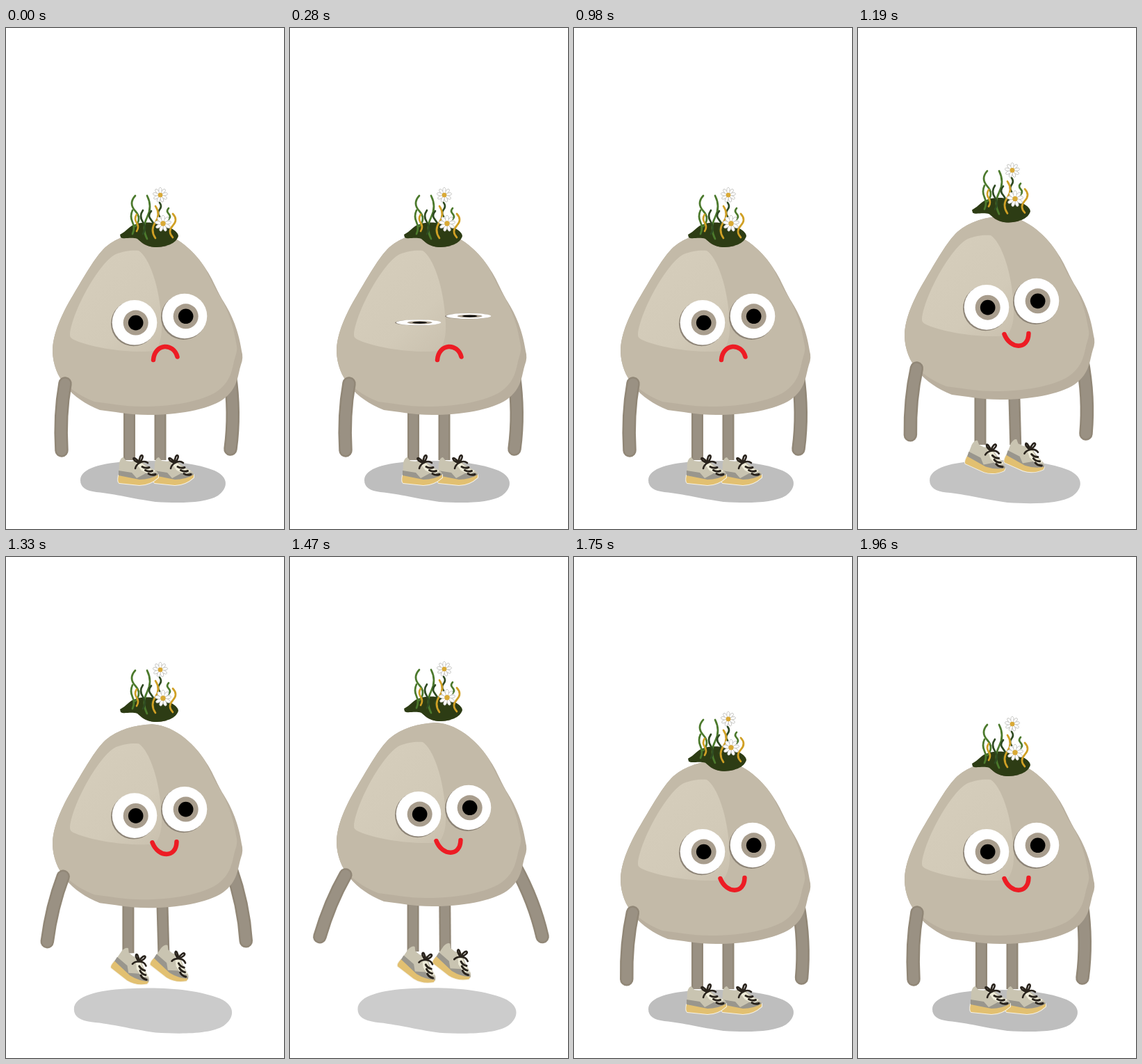
An HTML page with a canvas for the animation above (2100 ms loop, 400 by 720 pixels).

```html
<!DOCTYPE html>
<html lang="en">
<head>
<meta charset="utf-8">
<title>Jumping stone</title>
<style>
html, body { margin: 0; width: 100%; height: 100%; overflow: hidden; background: #fff; }
canvas { display: block; width: 400px; height: 720px; }
</style>
</head>
<body>
<canvas id="stage" width="400" height="720"></canvas>
<script>
const ctx = document.getElementById('stage').getContext('2d');
const LOOP = 2100, STEP = 70;

const shapes = {
  ground: 'M107 650C107 632 140 625 175 623C225 620 270 624 300 636C322 646 319 662 305 672' +
    'C287 683 250 683 215 681C180 676 160 670 130 667C115 665 107 660 107 650Z',
  stone: 'M210 292C185 293 160 300 143 315C128 329 112 358 97 383C80 411 67 440 67 465' +
    'C68 502 94 533 135 549C155 551 175 556 205 556C245 556 290 549 312 534' +
    'C334 518 333 500 338 484Q342 474 339 464C334 430 322 407 311 390C300 370 297 360 288 347' +
    'C275 325 245 294 210 292Z',
  shine: 'M92 440C96 405 135 336 158 325C170 320 182 319 191 320C206 330 222 372 224 425' +
    'Q225 452 214 464C180 468 125 460 100 449Q91 446 92 440Z',
  mound: 'M164 297Q171 293 176 288C185 279 203 278 217 281C234 284 248 292 248 299' +
    'C245 310 230 315 214 315C201 314 195 308 189 303C180 300 169 304 165 301Z',
  soil: 'M190 302C196 313 211 318 232 313L218 308Z',
  leftArm: 'M0 0Q-8 45 -5 96',
  rightArm: 'M-3 -10Q5 45 -2 97',
  upper: 'M-14 0Q-12 -8 -8 -8L-4 -3L4 -2L14 -6Q22 3 36 10Q43 13 42 19Q28 26 15 26L-15 22Z',
  side: 'M-15 11L4 14L11 22L24 15L38 14Q43 15 42 19Q28 26 15 26L-15 22Z',
  tongue: 'M8 -2L18 0Q26 8 38 11L31 17L18 11Z',
  sole: 'M-15 18Q-17 27 -14 29L15 32Q30 32 42 21L42 17Q30 24 15 24Z',
  bow: 'M15 0C5 -14 2 -3 15 0C14 -17 26 -12 15 0M15 0Q22 -4 27 0M15 0Q10 3 9 8'
};
for (const name in shapes) shapes[name] = new Path2D(shapes[name]);

const progress = (t, from, to) => Math.min(1, Math.max(0, (t - from) / (to - from)));
const smooth = (t, from, to) => {
  const p = progress(t, from, to);
  return p * p * (3 - 2 * p);
};
const fall = (t, from, to) => progress(t, from, to) ** 1.5;

function poseAt(t) {
  const lift = 54 * (smooth(t, 1050, 1370) - fall(t, 1540, 1750));
  return {
    lift,
    tuft: 79 * (smooth(t, 1050, 1350) - fall(t, 1520, 1765)),
    swing: smooth(t, 1090, 1590) - smooth(t, 1580, 1790),
    tilt: smooth(lift, 0, 40),
    smile: smooth(t, 1050, 1190),
    open: 1 - .92 * Math.sin(Math.PI * progress(t, 140, 490))
  };
}

function fill(path, color) {
  ctx.fillStyle = color;
  ctx.fill(path);
}

function stroke(path, color, width, cap = 'round') {
  ctx.strokeStyle = color;
  ctx.lineWidth = width;
  ctx.lineCap = cap;
  ctx.lineJoin = 'round';
  ctx.stroke(path);
}

function disc(x, y, r, color) {
  ctx.beginPath();
  ctx.arc(x, y, r, 0, 7);
  ctx.fillStyle = color;
  ctx.fill();
}

function placed(x, y, degrees, draw) {
  ctx.save();
  ctx.translate(x, y);
  ctx.rotate(degrees * Math.PI / 180);
  draw();
  ctx.restore();
}

function drawLimb(path, width, cap) {
  stroke(path, '#918777', width, cap);
  stroke(path, '#9a9183', width - 5, cap);
}

function drawLeg(x, lift) {
  drawLimb(new Path2D(`M${x} ${540 - lift}V${621 - lift}`), 17, 'butt');
}

function drawShoe(x, y, turn) {
  placed(x, y, turn, () => {
    stroke(shapes.sole, '#f5f2e8', 2);
    fill(shapes.upper, '#c9c4b1');
    fill(shapes.side, '#99968d');
    fill(shapes.tongue, '#eeebd8');
    fill(shapes.sole, '#e2c071');
    for (let i = 0; i < 3; i++) {
      stroke(new Path2D(`M${19 + 4.5 * i} ${5.5 + 5 * i}q5 3 10 1`), '#29231c', 3);
    }
    stroke(shapes.bow, '#29231c', 2.6);
  });
}

function drawDaisy(x, y, r) {
  placed(x, y, 0, () => {
    for (let i = 0; i < 9; i++) {
      ctx.rotate(2 * Math.PI / 9);
      ctx.beginPath();
      ctx.ellipse(0, -r * .62, r * .2, r * .4, 0, 0, 7);
      ctx.fillStyle = '#fff';
      ctx.fill();
      ctx.strokeStyle = '#bdbdb9';
      ctx.lineWidth = .8;
      ctx.stroke();
    }
    disc(0, 0, r * .32, '#d9a935');
  });
}

// An S-shaped blade that first bends by the given amount
function drawBlade(color, x, top, height, bend) {
  const path = `M${x} ${top}q${2 * bend} ${height / 4} 0 ${height / 2}t0 ${height / 2}`;
  stroke(new Path2D(path), color, 2.7);
}

function drawTuft() {
  const green = '#4c7a2d', dark = '#2f4a22', yellow = '#d0a025';
  fill(shapes.soil, '#5c5040');
  fill(shapes.mound, '#2d3c14');
  drawBlade(green, 186, 241, 44, -5);
  drawBlade(green, 203, 241, 62, 4);
  drawBlade(green, 182, 262, 34, -2);
  drawBlade(dark, 197, 262, 34, -3);
  drawBlade(dark, 209, 263, 26, -3);
  drawBlade(dark, 221, 251, 20, 2);
  drawBlade(green, 234, 259, 16, -2);
  drawBlade(yellow, 188, 268, 24, -2);
  drawBlade(yellow, 215, 256, 46, 4);
  drawBlade(yellow, 240, 267, 34, 4);
  drawDaisy(222, 240, 10.5);
  drawDaisy(226, 281, 11.5);
}

function drawEye(x, y, open) {
  ctx.save();
  ctx.translate(x, y);
  ctx.scale(1, open);
  disc(-1.5, 1.5, 32.5, '#8d8477');
  disc(0, 0, 32.3, '#fff');
  disc(1.7, .3, 18, '#a89d8d');
  disc(1.7, .3, 10.8, '#000');
  ctx.restore();
}

function drawMouth(smile) {
  const sad = [212, 477, 214, 453, 241, 452, 246.5, 472.5];
  const glad = [210.5, 462, 219, 484, 245, 485, 245.5, 461];
  const [x, y, ...bend] = sad.map((v, i) => v + (glad[i] - v) * smile);
  const path = new Path2D();
  path.moveTo(x, y);
  path.bezierCurveTo(...bend);
  stroke(path, '#ed1c24', 6.5);
}

function drawStone() {
  ctx.save();
  fill(shapes.stone, '#b9af9e');
  ctx.clip(shapes.stone);
  ctx.translate(-8, -12);
  fill(shapes.stone, '#c3baa8');
  ctx.restore();
  const light = ctx.createLinearGradient(110, 350, 220, 470);
  light.addColorStop(0, '#d5cdbb');
  light.addColorStop(.6, '#d2cab8');
  light.addColorStop(1, '#c9c0ae');
  fill(shapes.shine, light);
}

function drawGround(lift) {
  const size = 1 + lift * .0017, gray = Math.round(190 + lift * .25);
  placed(211.5, 652, 0, () => {
    ctx.scale(size, size);
    ctx.translate(-211.5, -652);
    fill(shapes.ground, `rgb(${gray},${gray},${gray})`);
  });
}

function render(t) {
  const { lift, tuft, swing, tilt, smile, open } = poseAt(t);
  const sway = tilt * (1 - swing);
  ctx.fillStyle = '#fff';
  ctx.fillRect(0, 0, 400, 720);
  drawGround(lift);
  placed(325 + 7 * swing, 508 - lift, -24 * swing, () => drawLimb(shapes.rightArm, 19.5));
  placed(-3 * sway, 0, 0, () => drawLeg(177.5, lift));
  placed(222 + 5 * sway, 540 - lift, -3 * sway, () => {
    ctx.translate(-222, lift - 540);
    drawLeg(222, lift);
  });
  drawShoe(228 + tilt * (10 - 6 * swing), 625 - 1.08 * lift, 32 * tilt);
  drawShoe(177 + 7 * swing * swing, 625 - lift, 32 * tilt);
  placed(0, -lift, 0, () => {
    drawStone();
    drawEye(185, 423.3, open);
    drawEye(257, 414, open);
    drawMouth(smile);
  });
  placed(0, -tuft, 0, drawTuft);
  placed(85 - 6 * swing, 511 - lift, 23 * swing, () => drawLimb(shapes.leftArm, 19.5));
}

const start = performance.now();
function tick() {
  const elapsed = Math.max(0, performance.now() - start) % LOOP;
  render(Math.floor(elapsed / STEP) * STEP);
  requestAnimationFrame(tick);
}
tick();
</script>
</body>
</html>
```
